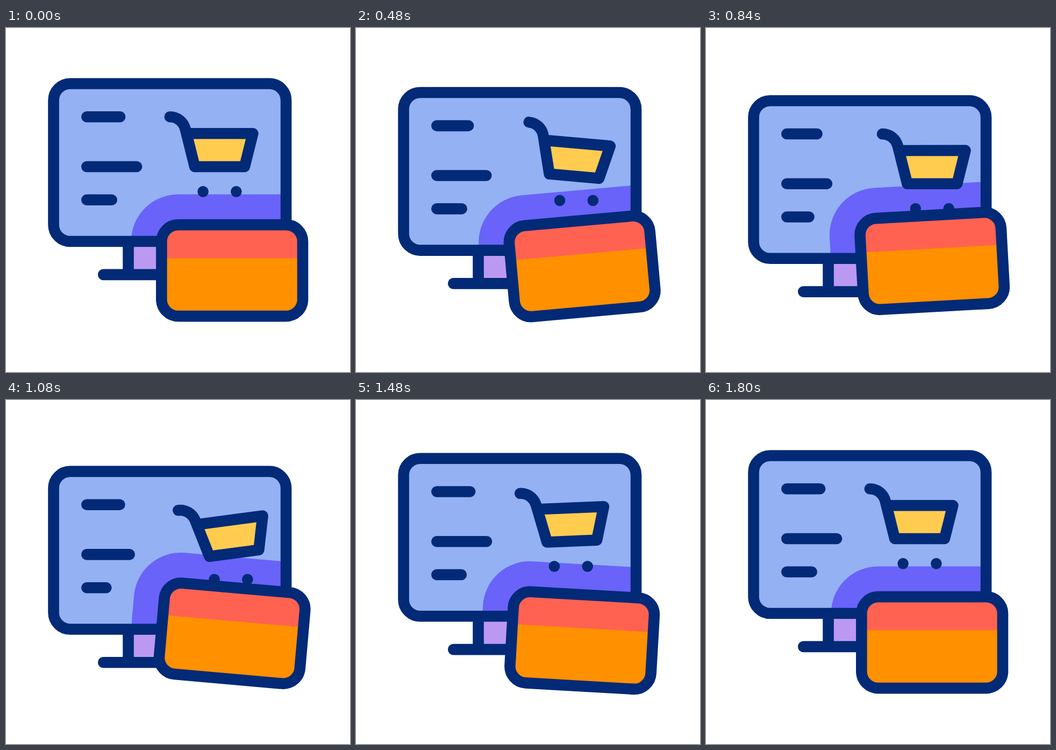
An HTML page for the animation above (1960 ms loop, 640 px wide and 640 px high).

```html
<!DOCTYPE html>
<html lang="en">
<head>
<meta charset="utf-8">
<title>Online shopping</title>
<style>
  html, body { margin: 0; width: 100%; height: 100%; overflow: hidden; background: #fff; }
  svg { display: block; width: 100%; height: 100%; }
  .line { fill: none; stroke: #032a77; stroke-width: 2; stroke-linecap: round; stroke-linejoin: round; }
</style>
</head>
<body>
<svg viewBox="0 0 640 640">
  <defs>
    <clipPath id="screen"><rect x="-6" y="-6" width="42" height="28.5" rx="3"/></clipPath>
    <clipPath id="face"><rect x="13.5" y="19.5" width="25.5" height="16.5" rx="3"/></clipPath>
  </defs>
  <g transform="translate(150.3 165.3) scale(10.3)">
    <g id="monitor">
      <rect x="7.5" y="22.5" width="12" height="6" fill="#bb99f2"/>
      <path class="line" d="M7.5 22.5V28.5M3 28.5H22"/>
      <g clip-path="url(#screen)">
        <rect x="-6" y="-6" width="42" height="28.5" fill="#93b1f3"/>
        <path id="shadow" fill="#6963f9" d="M8 48V22.5a8.5 8.5 0 0 1 8.5 -8.5H48V48Z"/>
      </g>
      <rect class="line" x="-6" y="-6" width="42" height="28.5" rx="3"/>
      <path class="line" id="bar0"/>
      <path class="line" id="bar1"/>
      <path class="line" id="bar2"/>
      <g id="cart">
        <g id="basket">
          <path fill="#ffcc50" d="M18 3H30L28.5 9H19.5Z"/>
          <path class="line" d="M15 0C16.35 0 17.45 .9 17.8 2.2L19.5 9H28.5L30 3H18.2"/>
        </g>
        <g fill="#032a77"><circle cx="21" cy="13.5" r="1"/><circle cx="27" cy="13.5" r="1"/></g>
      </g>
    </g>
    <g id="card">
      <g clip-path="url(#face)">
        <rect x="13.5" y="19.5" width="25.5" height="16.5" fill="#ff9000"/>
        <rect x="13.5" y="19.5" width="25.5" height="6.03" fill="#ff6250"/>
      </g>
      <rect class="line" x="13.5" y="19.5" width="25.5" height="16.5" rx="3"/>
    </g>
  </g>
</svg>
<script>
const LOOP = 1960, END = 1800, STEP = 40;
const el = id => document.getElementById(id);
const move = (id, value) => el(id).setAttribute('transform', value);

// Cubic ease with control points (.5, 0) and (.5, 1), running from start to end
function ease(t, start, end) {
  const x = Math.min(1, Math.max(0, (t - start) / (end - start)));
  let lo = 0, hi = 1;
  for (let i = 0; i < 24; i++) {
    const u = (lo + hi) / 2;
    if (1.5 * u * (1 - u) + u ** 3 < x) lo = u; else hi = u;
  }
  return lo * lo * (3 - 2 * lo);
}

// Out and back again
const swing = (t, a, b, c, d) => ease(t, a, b) - ease(t, c, d);

const bars = [
  { y: 0, length: 6, shrink: 0.63, times: [288, 686, 686, 1215] },
  { y: 9, length: 9, shrink: 1.8, times: [400, 900, 880, 1400] },
  { y: 15, length: 4.5, shrink: 1, times: [590, 1090, 1090, 1590] }
];

function draw(t) {
  const drop = 3.1 * swing(t, 50, 895, 895, 1735);
  const slide = 2.26 * swing(t, 60, 870, 890, 1670);
  const tilt = 5.3 * ease(t, 18, 570) - 13.1 * ease(t, 585, 1145) + 7.8 * ease(t, 1145, 1702);
  const lift = -1.76 * swing(t, 80, 945, 905, 1775);
  const turn = -6 * ease(t, 95, 635) + 12 * ease(t, 637, 1208) - 6 * ease(t, 1211, 1775);
  const cardPose = dy => `translate(0 ${dy}) rotate(${turn} 26.25 27.75)`;

  move('monitor', `translate(0 ${drop})`);
  move('shadow', cardPose(lift - drop));
  move('cart', `translate(${slide} 0)`);
  move('basket', `rotate(${tilt} 22.5 4.5)`);
  move('card', cardPose(lift));
  bars.forEach((bar, i) => {
    const end = bar.length - bar.shrink * swing(t, ...bar.times);
    el('bar' + i).setAttribute('d', `M0 ${bar.y}H${end}`);
  });
}

const origin = performance.now();
function tick() {
  const t = (performance.now() - origin) % LOOP;
  draw(Math.min(END, Math.floor(t / STEP) * STEP));
  requestAnimationFrame(tick);
}
tick();
</script>
</body>
</html>
```
